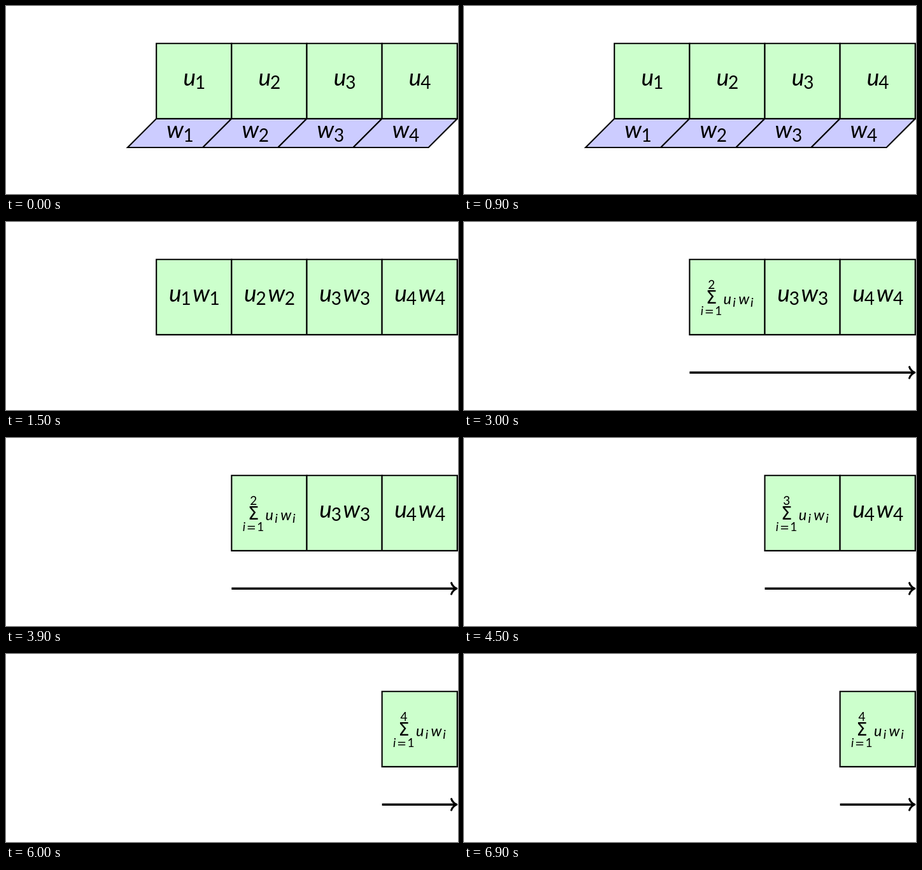
Recreate the animation shown at these times as an HTML page. Size 710 px wide and 295 px high, loop 7500 ms.

```html
<!DOCTYPE html>
<html lang="en">
<head>
<meta charset="utf-8">
<style>
  html, body { margin: 0; width: 100%; height: 100%; overflow: hidden; background: #fff; }
  svg { display: block; font-family: Lato, "Noto Sans", sans-serif; text-anchor: middle; }
  path { stroke: #000; stroke-width: 2.1; }
  .arrow { fill: none; stroke-width: 3.4; }
  .head { fill: none; stroke-width: 3.1; stroke-linecap: round; stroke-linejoin: round; }
  .var { font-style: italic; }
  .sign { font-family: "DejaVu Sans", sans-serif; }
</style>
</head>
<body>
<svg id="stage" width="710" height="295" viewBox="0 0 710 295"></svg>
<script>
const stage = document.getElementById('stage');
const LEFT = 236.2, TOP = 58.7, SIDE = 118.15, COUNT = 4, STEP = 1500;
const BASE = TOP + SIDE;
const cellX = n => LEFT + (n - 1) * SIDE;

const text = (x, y, size, str, cls = '') =>
  `<text x="${x}" y="${y}" font-size="${size}" class="${cls}">${str}</text>`;

const indexed = (name, n, x, y, gap) =>
  text(x, y, 37, name, 'var') + text(x + gap, y + 5.5, 28, n);
const u = (n, x) => indexed('u', n, x, 124.5, 16.8);
const w = (n, x, y) => indexed('w', n, x, y, 21);

const square = n =>
  `<path fill="#cfc" d="M${cellX(n)} ${TOP}h${SIDE}v${SIDE}h${-SIDE}z"/>`;
const slanted = n =>
  `<path fill="#ccf" d="M${cellX(n)} ${BASE}h${SIDE}l-45.2 45.2h${-SIDE}z"/>`;

const pair = n => slanted(n) + square(n) +
  u(n, cellX(n) + 52) + w(n, cellX(n) + 29.5, 207);

const product = n => square(n) +
  u(n, cellX(n) + 29.5) + w(n, cellX(n) + 70.5, 124.5);

function sum(n) {
  const x = cellX(n);
  return square(n) +
    text(x + 34.3, 104.5, 19, n) +
    text(x + 34.3, 128, 27.5, 'Σ', 'sign') +
    text(x + 19.5, 145.5, 19, 'i', 'var') +
    text(x + 31, 145.5, 18, '=', 'sign') +
    text(x + 45.3, 145.5, 19, '1') +
    text(x + 59.5, 128.5, 23.5, 'u', 'var') +
    text(x + 70.3, 132.5, 20, 'i', 'var') +
    text(x + 85.3, 128.5, 23.5, 'w', 'var') +
    text(x + 98, 132.5, 20, 'i', 'var');
}

const arrow = n => `<path class="arrow" d="M${cellX(n)} 236.2H708"/>
  <path class="head" d="M699.6 227.4C700.6 231.8 705.3 235.3 707.8 236.2C705.3 237.1 700.6 240.6 699.6 245"/>`;

function scene(step) {
  const cells = Array.from({ length: COUNT }, (_, i) => i + 1);
  if (step === 0) return cells.map(pair).join('');
  if (step === 1) return cells.map(product).join('');
  return sum(step) + cells.slice(step).map(product).join('') + arrow(step);
}

let shown = -1;
function draw() {
  const step = Math.floor(performance.now() / STEP) % 5;
  if (step !== shown) stage.innerHTML = scene(shown = step);
  requestAnimationFrame(draw);
}
draw();
</script>
</body>
</html>
```
